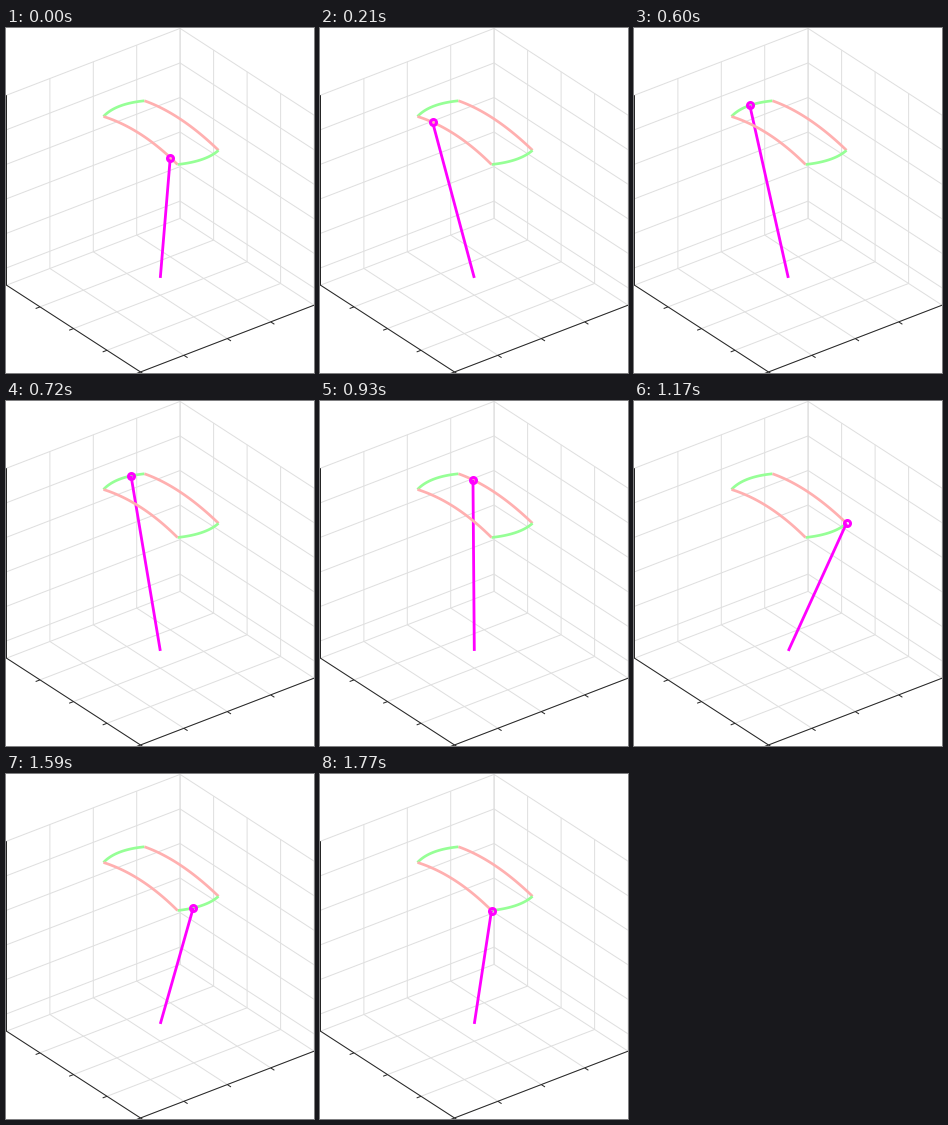
A matplotlib script for the animation above (1800 ms loop, 308 by 345 pixels).

```python
import numpy as np
import matplotlib.pyplot as plt
from matplotlib.animation import FuncAnimation

W, H, DPI = 308, 345, 100
PX = 72 / DPI
PINK, GREEN, MAGENTA = "#ffb0b0", "#96ff96", "#ff00ff"
GRID = "#dfdfdf"

fig = plt.figure(figsize=(W / DPI, H / DPI), dpi=DPI, facecolor="white")
ax = fig.add_axes([0, 0, 1, 1])
ax.set_xlim(-0.5, W - 0.5)
ax.set_ylim(H - 0.5, -0.5)
ax.axis("off")


def project(x, y, z):
    """Orthographic view of the box [-1, 1] x [-1, 1] x [-0.1, 1]."""
    return (153.8 + 86.8 * x - 67 * y,
            249.4 - 33.4 * x - 43.4 * y - 172.7 * z)


def line(points, color, width=1.0, z=1, cap="butt"):
    xs, ys = zip(*points)
    return ax.plot(xs, ys, color=color, lw=width * PX, zorder=z,
                   solid_capstyle=cap, solid_joinstyle="round")[0]


def edge(*corners, color=GRID, width=1.0, z=1):
    line([project(*c) for c in corners], color, width, z)


# Grid on the floor and the two back walls
LOW, TOP = -0.1, 1.0
for v in np.linspace(-1, 1, 5):
    edge((v, -1, LOW), (v, 1, LOW), (v, 1, TOP))
    edge((-1, v, LOW), (1, v, LOW), (1, v, TOP))
for h in np.linspace(0, 1, 6):
    edge((-1, 1, h), (1, 1, h), (1, -1, h))

# Axis lines and ticks
edge((-1, 1, TOP), (-1, 1, LOW), (-1, -1, LOW), (1, -1, LOW),
     color="#262626", z=2)
for v in np.linspace(-1, 1, 5):
    edge((v, -1, LOW), (v, -1.055, LOW), color="#262626", z=2)
    edge((-1, v, LOW), (-1.05, v, LOW), color="#262626", z=2)

# Closed path: start, end, bulge, steps, colour, depth
A, B, C, D = map(np.array, [(171, 136), (97, 88), (138, 72.3), (212, 121.8)])
ARCS = [(A, B, (0.5, -6), 10, PINK, 6),
        (B, C, (-4.3, -2.5), 20, GREEN, 3),
        (C, D, (-0.5, -6), 10, PINK, 3),
        (D, A, (4.1, 2), 20, GREEN, 3)]


def arc_point(start, end, bulge, t):
    return start + (end - start) * t + 4 * t * (1 - t) * np.array(bulge)


for start, end, bulge, _, color, depth in ARCS:
    line([arc_point(start, end, bulge, t) for t in np.linspace(0, 1, 41)],
         color, 2.7, depth)

BASE = project(0, 0, 0)
rod = line([BASE, A], MAGENTA, 2.8, 4)
tip, = ax.plot([], [], "o", ms=6 * PX, mew=3 * PX, mfc="none",
               mec=MAGENTA, zorder=7)


def tip_at(step):
    for start, end, bulge, steps, *_ in ARCS:
        if step <= steps:
            return arc_point(start, end, bulge, step / steps)
        step -= steps


def update(i):
    x, y = tip_at(i + 1)
    rod.set_data([BASE[0], x], [BASE[1], y])
    tip.set_data([x], [y])
    return rod, tip


anim = FuncAnimation(fig, update, frames=60, interval=30, repeat=True,
                     repeat_delay=0, blit=False)
plt.show()
```
